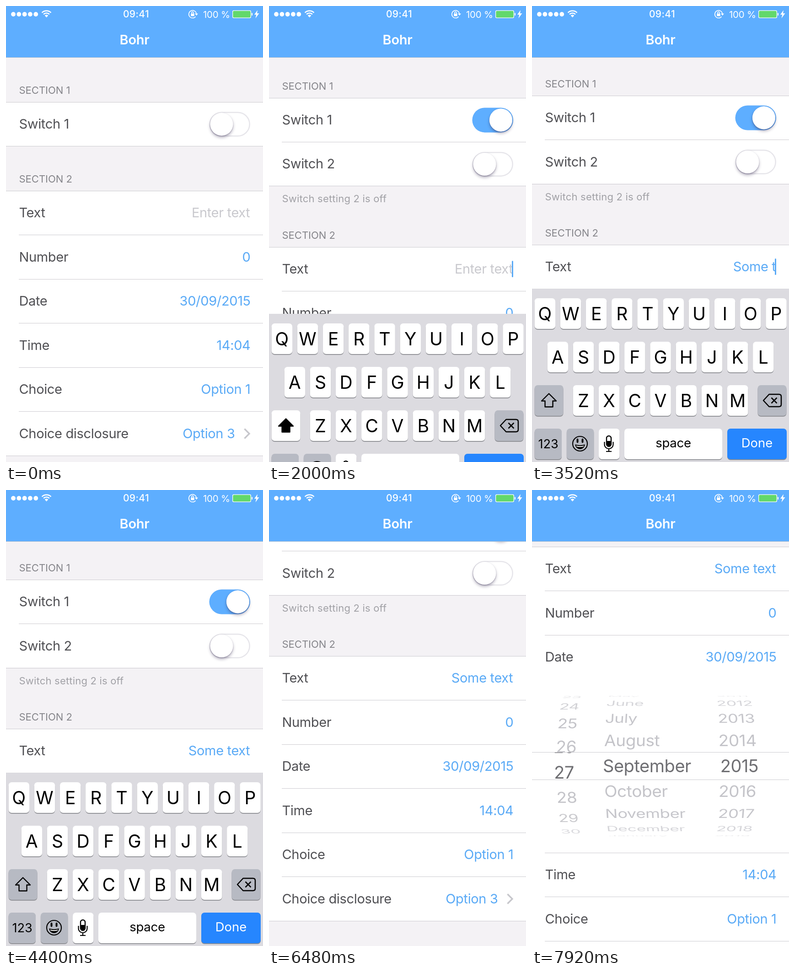
Recreate the animation shown at these times as an HTML page with a canvas. Size 562 by 997 pixels, loop 8 s.

```html
<!DOCTYPE html>
<html lang="en">
<head>
<meta charset="utf-8">
<title>Settings</title>
<style>
html, body { margin: 0; width: 100%; height: 100%; overflow: hidden; background: #f4f2f5; }
canvas { display: block; width: 100%; height: 100%; }
</style>
</head>
<body>
<canvas id="stage" width="562" height="997"></canvas>
<script>
const W = 562, H = 997, ROW = 96.5, PICKER = 379.5, LOOP = 8000, STEP = 80;
const BLUE = '#5eaeff', VALUE = '#5aaaf6', INK = '#505054', GREY = '#f4f2f5', LINE = '#cccbd0';
const FONT = 'Inter, Roboto, sans-serif';
const ctx = document.getElementById('stage').getContext('2d');

const clamp = x => Math.max(0, Math.min(1, x));
const span = (t, a, b) => clamp((t - a) / (b - a));
const smooth = (t, a, b) => { const u = span(t, a, b); return u * u * (3 - 2 * u); };
const easeOut = (t, a, b) => 1 - (1 - span(t, a, b)) ** 3;

function text(str, x, y, size, color, { align = 'left', weight = 400, track = 0 } = {}) {
  ctx.font = `${weight} ${size}px ${FONT}`;
  ctx.letterSpacing = `${track * size}px`;
  ctx.textAlign = align;
  ctx.fillStyle = color;
  ctx.fillText(str, x, y);
}

function rect(x, y, w, h, color) {
  ctx.fillStyle = color;
  ctx.fillRect(x, y, w, h);
}

function round(x, y, w, h, r, color) {
  ctx.beginPath();
  ctx.roundRect(x, y, w, h, r);
  ctx.fillStyle = color;
  ctx.fill();
}

function disc(x, y, r, color) {
  ctx.beginPath();
  ctx.arc(x, y, r, 0, 7);
  ctx.fillStyle = color;
  ctx.fill();
}

function stroke(path, color, width) {
  ctx.strokeStyle = color;
  ctx.lineWidth = width;
  ctx.stroke(new Path2D(path));
}

function fill(path, color) {
  ctx.fillStyle = color;
  ctx.fill(new Path2D(path));
}

function clipped(x, y, w, h, draw) {
  ctx.save();
  ctx.beginPath();
  ctx.rect(x, y, w, h);
  ctx.clip();
  draw();
  ctx.restore();
}

function moved(x, y, draw) {
  ctx.save();
  ctx.translate(x, y);
  draw();
  ctx.restore();
}

function shadow(color, blur, dy) {
  ctx.shadowColor = color;
  ctx.shadowBlur = blur;
  ctx.shadowOffsetY = dy;
}

const line = (y, x = 0) => rect(x, Math.round(y), W - x, 1, LINE);
const BODY = { track: -0.012 };
const BODY_RIGHT = { track: -0.012, align: 'right' };

// ---- Status and navigation bar ----
function navBar() {
  rect(0, 0, W, 112, BLUE);
  rect(0, 112, W, 1, '#a9bccf');
  for (let i = 0; i < 5; i++) disc(16 + i * 12.3, 18, 4.9, '#fff');
  moved(88.5, 24.5, () => {
    for (const r of [14, 9]) {
      ctx.beginPath();
      ctx.arc(0, 0, r, -Math.PI * 0.75, -Math.PI * 0.25);
      ctx.strokeStyle = '#fff';
      ctx.lineWidth = 2.7;
      ctx.stroke();
    }
    fill('M0 .5L-3.8 -3.8Q0 -7 3.8 -3.8Z', '#fff');
  });
  text('09:41', 284.5, 25, 21, '#fff', { align: 'center', weight: 500, track: 0.02 });
  moved(408, 18, () => {
    stroke('M6.5 5.2A8.3 8.3 0 1 1 8.3 -1', '#fff', 1.6);
    fill('M5 -1.5H12L8.5 3Z', '#fff');
    round(-3.7, -1.5, 7.4, 5.8, 1, '#fff');
    stroke('M-2.2 -1V-3A2.2 2.2 0 0 1 2.2 -3V-1', '#fff', 1.4);
  });
  text('100 %', 490, 25.5, 20.5, '#fff', { align: 'right', track: -0.01 });
  round(495, 9.5, 41, 17, 3, '#fff');
  round(496.3, 10.8, 38.4, 14.4, 2, '#62d86b');
  round(537, 15, 2, 6, 1, '#fff');
  fill('M550 9L543 19H547.3L545.5 27L553.5 16H549Z', '#fff');
  text('Bohr', 281, 84, 29, '#fff', { align: 'center', weight: 600, track: -0.01 });
}

// ---- Table ----
function toggle(cy, on = 0, press = 0) {
  const x = 444.5, y = cy - 27, w = 89.5, h = 54;
  round(x, y, w, h, 27, '#e6e5ea');
  const k = 1 - Math.max(on, press);
  if (k > 0) {
    const iw = (w - 5) * k, ih = (h - 5) * k;
    round(x + (w - iw) / 2, cy - ih / 2, iw, ih, ih / 2, '#fff');
  }
  ctx.globalAlpha = on;
  round(x, y, w, h, 27, BLUE);
  ctx.globalAlpha = 1;
  const kw = 50 + 11 * press;
  const kx = 446.5 + on * (85.5 - kw);
  for (const [color, blur, dy] of [['rgba(40,30,70,.35)', 6, 4], ['rgba(40,30,70,.3)', 2, 1]]) {
    ctx.save();
    shadow(color, blur, dy);
    round(kx, cy - 25, kw, 50, 25, '#fff');
    ctx.restore();
  }
}

const label = (str, top) => text(str, 28.5, top + 58, 29, INK, BODY);
const header = (str, top) => text(str, 28.5, top - 18, 22, '#85858a');

function row(name, value, top, color = VALUE, right = 534.5) {
  label(name, top);
  text(value, right, top + 58, 29, color, BODY_RIGHT);
}

const MONTHS = ['January', 'February', 'March', 'April', 'May', 'June', 'July',
  'August', 'September', 'October', 'November', 'December'];
const month = i => MONTHS[(i + 11) % 12];
const day = i => String((i + 30) % 31 + 1);

function wheel(pos, x, align, name, cy, band) {
  const R = 153, step = 21.3 * Math.PI / 180;
  for (let i = Math.ceil(pos - 4.15); i <= pos + 4.15; i++) {
    const a = (i - pos) * step, c = Math.cos(a);
    const s = band ? 1 : 0.98 - 0.075 * (1 - c);
    ctx.save();
    ctx.globalAlpha *= band ? 1 : Math.min(1, 0.3 + 0.9 * c);
    ctx.transform(s, 0, (281 - x) * 0.075 * Math.sin(a) / R, s * c,
      281 + (x - 281) * s, cy + R * Math.sin(a));
    text(name(i), 0, 13.8, 38, band ? '#6f6f73' : '#c4c4c9', { align, track: -0.012 });
    ctx.restore();
  }
}

function picker(top, dayPos) {
  const cy = top + PICKER / 2;
  const wheels = band => {
    wheel(dayPos, 70, 'center', day, cy, band);
    wheel(9, 155, 'left', month, cy, band);
    wheel(2015, 453.5, 'center', String, cy, band);
  };
  clipped(0, cy - 155, W, 125, () => wheels(false));
  clipped(0, cy + 30, W, 126, () => wheels(false));
  clipped(0, cy - 30, W, 60, () => wheels(true));
  line(cy - 30.5);
  line(cy + 30);
}

function table(t, typed) {
  const scroll = 14 * smooth(t, 1700, 2200) + 159 * smooth(t, 5172, 6047)
    + 239 * smooth(t, 6520, 7000);
  const press = smooth(t, 450, 600) * (1 - smooth(t, 680, 900));
  const on = smooth(t, 640, 880);
  const open = smooth(t, 700, 1060);
  const expand = smooth(t, 6520, 7000);

  rect(0, 0, W, H, GREY);
  const s1 = 210 - scroll, s1End = s1 + ROW * (1 + open) - 0.5;
  header('SECTION 1', s1);
  rect(0, s1, W, s1End - s1, '#fff');
  if (open > 0) {
    clipped(0, s1 + ROW, W, ROW * open, () => {
      ctx.globalAlpha = open;
      label('Switch 2', s1 + ROW);
      ctx.globalAlpha = 1;
      toggle(s1 + ROW + 48.5);
    });
    line(s1 + ROW - 0.5, 28);
    ctx.globalAlpha = open;
    text('Switch setting 2 is off', 28.5, s1End + 36, 22, '#a1a1a6', { track: 0.009 });
    ctx.globalAlpha = 1;
  }
  label('Switch 1', s1);
  toggle(s1 + 48.5, on, press);
  line(s1);
  line(s1End);

  const s2 = 404 + 132 * open - scroll;
  const grow = PICKER * expand;
  const at = i => s2 + i * ROW + (i > 2 ? grow : 0);
  header('SECTION 2', s2);
  rect(0, s2, W, at(6) - s2, '#fff');
  row('Text', typed || 'Enter text', at(0), typed ? VALUE : '#c9c9ce', 533.5);
  row('Number', '0', at(1));
  row('Date', '30/09/2015', at(2));
  row('Time', '14:04', at(3));
  row('Choice', 'Option 1', at(4));
  row('Choice disclosure', 'Option 3', at(5), VALUE, 500.5);
  moved(0, at(5), () => stroke('M521.5 38L532 48.5L521.5 59', '#c7c7cc', 3.4));
  if (grow > 0) {
    clipped(0, at(2) + ROW, W, grow, () => {
      ctx.globalAlpha = expand;
      picker(at(2) + ROW, 30 - 3.255 * span(t, 7280, 7920) ** 1.2);
    });
  }
  line(s2);
  for (let i = 1; i < 6; i++) line(at(i) - 0.5, 28);
  line(at(6) - 0.5);

  const typing = t > 2400 && t < 4360;
  if (typing || (t > 1640 && t < 2400 && (t - 1640) % 1000 < 600)) {
    round(531, s2 + 30, 3, 36, 1.5, VALUE);
  }

  const bar = smooth(t, 5150, 5250) * (1 - span(t, 6040, 6340));
  if (bar > 0) round(552, 117 + scroll * 0.69, 5, 601, 2.5, `rgba(0,0,0,${0.35 * bar})`);
}

// ---- Keyboard ----
const KEY_W = 45.5, KEY_H = 67, PITCH = 56.2;
const KEYS = [['QWERTYUIOP', 5.5, 21], ['ASDFGHJKL', 33.5, 116], ['ZXCVBNM', 89.7, 211]];
const MESSAGE = 'Some text';
const HOLD = 110;
const pressAt = i => 2475 + i * 160 + Math.max(0, i - 2) * 40;

function cap(x, y, w, color = '#fff') {
  round(x, y + 1.8, w, KEY_H, 7, '#8b8c91');
  round(x, y, w, KEY_H, 7, color);
}

function popup(letter, x, y) {
  ctx.save();
  shadow('rgba(0,0,0,.4)', 8, 2);
  moved(x, y, () => fill(
    'M-9 -111H54.5Q68.5 -111 68.5 -97V-42C68.5 -22 45.5 -20 45.5 2V60Q45.5 67 38.5 67' +
    'H7Q0 67 0 60V2C0 -20 -23 -22 -23 -42V-97Q-23 -111 -9 -111Z', '#fff'));
  ctx.restore();
  text(letter, x + KEY_W / 2, y - 35, 69, '#000', { align: 'center', weight: 300 });
}

function keyboard(top, shifted, active) {
  const dark = '#b7bac3';
  moved(0, top, () => {
    rect(0, 0, W, 379, '#dcdbe0');
    let hit = null;
    for (const [letters, x0, y] of KEYS) {
      [...letters].forEach((c, i) => {
        const x = x0 + i * PITCH;
        cap(x, y, KEY_W);
        if (c === active) hit = [c, x, y];
        else text(c, x + KEY_W / 2, y + 48, 39, '#000', { align: 'center' });
      });
    }

    cap(5.5, 211, 63, shifted ? '#fff' : dark);
    const arrow = 'M37 229.5L53 245.5H45.5V258.5H28.5V245.5H21Z';
    ctx.lineJoin = 'round';
    if (shifted) fill(arrow, '#000');
    stroke(arrow, '#000', 2.4);

    cap(493.5, 211, 63, dark);
    stroke('M506 244.5L518.5 231H540Q545 231 545 236V253Q545 258 540 258H518.5Z', '#000', 2.5);
    stroke('M523.5 238.5L535.5 250.5M535.5 238.5L523.5 250.5', '#000', 2.5);

    cap(5.5, 306, 59.5, dark);
    text('123', 35.5, 349, 27, '#000', { align: 'center' });

    cap(75.8, 306, 59.5, dark);
    moved(105, 339, () => {
      stroke('M-16 0A16 16 0 1 1 16 0A16 16 0 1 1 -16 0Z', '#000', 2.2);
      fill('M-7.5 -8A2 3.3 0 1 1 -3.5 -8V-5A2 3.3 0 0 1 -7.5 -5ZM3.5 -8A2 3.3 0 1 1 7.5 -8V-5A2 3.3 0 0 1 3.5 -5Z', '#000');
      fill('M-11 1.5Q0 5 11 1.5Q9 12 0 12Q-9 12 -11 1.5Z', '#000');
      fill('M-8.5 4Q0 6.5 8.5 4L7.5 6.2Q0 8.4 -7.5 6.2Z', '#fff');
    });

    cap(146, 306, KEY_W);
    moved(168, 339, () => {
      ctx.beginPath();
      ctx.roundRect(-5, -17, 10, 23, 5);
      ctx.strokeStyle = '#000';
      ctx.lineWidth = 2.4;
      ctx.stroke();
      fill('M-4 -6H4V1A4 4 0 0 1 -4 1Z', '#000');
      stroke('M-9.5 -4V1.5A9.5 9.5 0 0 0 9.5 1.5V-4M0 11V17M-6 17H6', '#000', 2.2);
    });

    cap(202, 306, 214);
    text('space', 309, 347, 27.5, '#000', { align: 'center', track: -0.01 });
    cap(427, 306, 130, '#2686fe');
    text('Done', 492, 347, 27.5, '#fff', { align: 'center' });
    if (hit) popup(...hit);
  });
}

// ---- Playback ----
function draw(t) {
  let count = 0, active = '';
  [...MESSAGE].forEach((c, i) => {
    const start = pressAt(i);
    if (t >= start + HOLD) count = i + 1;
    else if (t >= start) active = c.toUpperCase();
  });
  ctx.setTransform(1, 0, 0, 1, 0, 0);
  table(t, MESSAGE.slice(0, count).trimEnd());
  navBar();
  const up = easeOut(t, 1696, 2336) - easeOut(t, 4420, 4960);
  if (up > 0) keyboard(Math.round(H - 379 * up), count === 0, active);
}

function tick(now) {
  draw(Math.floor(now % LOOP / STEP) * STEP);
  requestAnimationFrame(tick);
}
draw(0);
requestAnimationFrame(tick);
</script>
</body>
</html>
```
